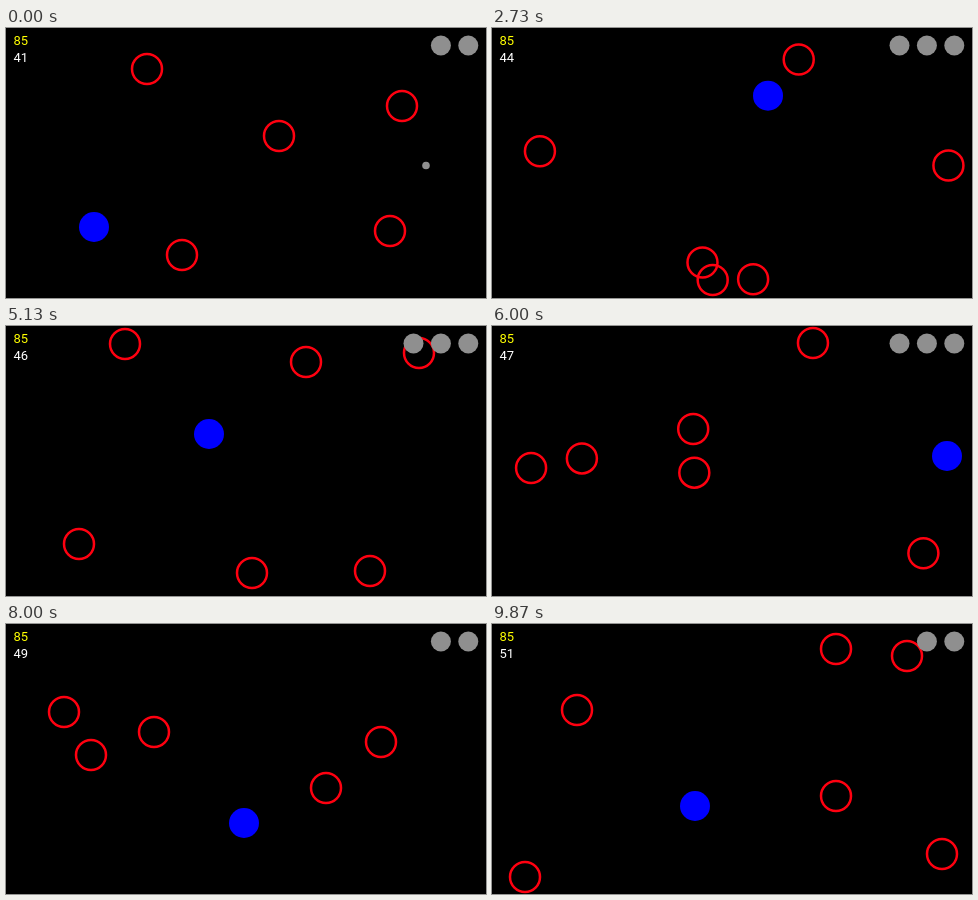
Animation, 480 px wide and 270 px high, one loop 9940 ms. Source, as an HTML page with a canvas:

```html
<!DOCTYPE html>
<html>
<head>
<meta charset="utf-8">
<style>
html, body { margin: 0; width: 100%; height: 100%; overflow: hidden; background: #000; }
canvas { display: block; }
</style>
</head>
<body>
<canvas id="stage" width="480" height="270"></canvas>
<script>
const ctx = document.getElementById('stage').getContext('2d');
const LOOP = 9940, LAST = 148, FPS = 15;

// Ticks at which the rings change course.
const TURNS = [0, 24, 57, 77, 102, 120, 148];
const always = () => true;

// Ring courses in unfolded space; the walls mirror them back onto the stage.
const RINGS = [
  { path: [[141, 41], [41, 181], [370, 285], [246, 247], [162, 54], [320, 164], [415, 476]], alive: always },
  { path: [[176, 227], [-72, 264], [-377, 250], [-532, 245], [-277, 211], [-116, 108], [-1, 253]], alive: always },
  { path: [[273, 108], [442, 251], [470, 483], [628, 472], [818, 343], [955, 250], [981, 422]], alive: n => n < 107 || n > 135 },
  { path: [[396, 78], [561, 205], [845, 304], [809, 490], [865, 270], [981, 131], [1240, 25]], alive: always },
  { path: [[384, 203], [231, 136], [378, -127], [515, 5], [692, 28], [553, -86], [478, -198]], alive: always },
  { path: [[200, 110], [84, 27], [-110, 214], [73, 290], [-81, 436], [58, 564], [344, 648]], alive: n => n > 19 }
];

const PLAYER_TURNS = [0, 20, 24, 57, 77, 90, 102, 120, 148];
const PLAYER = [[88, 199], [405, 132], [344, 80], [212, 56], [203, 108], [455, 130], [360, 186], [238, 199], [203, 182]];

function along(times, points, n) {
  let i = 0;
  while (i < times.length - 2 && n >= times[i + 1]) i++;
  const k = (n - times[i]) / (times[i + 1] - times[i]);
  return points[i].map((v, axis) => v + (points[i + 1][axis] - v) * k);
}

function bounce(v, min, max) {
  const span = max - min, period = 2 * span;
  const m = ((v - min) % period + period) % period;
  return min + (m > span ? period - m : m);
}

function circle(x, y, r) {
  ctx.beginPath();
  ctx.arc(x, y, r, 0, 2 * Math.PI);
}

function disc(x, y, r, color) {
  circle(x, y, r);
  ctx.fillStyle = color;
  ctx.fill();
}

function label(text, y, color) {
  ctx.fillStyle = color;
  ctx.fillText(text, 7.5, y);
}

function draw(n) {
  ctx.fillStyle = '#000';
  ctx.fillRect(0, 0, 480, 270);

  if (n < 20) disc(420, 137.5, 3.8, '#8f8f8f');
  if (n >= 100 && n < 107) disc(219 - 28 * (n - 102), 185, 3.8, '#fff');

  disc(...along(PLAYER_TURNS, PLAYER, n), 15, '#00f');

  ctx.strokeStyle = '#ff0010';
  ctx.lineWidth = 2.5;
  for (const ring of RINGS) {
    if (!ring.alive(n)) continue;
    const [x, y] = along(TURNS, ring.path, n);
    circle(bounce(x, 16, 464), bounce(y, 16, 254), 15);
    ctx.stroke();
  }

  const shots = n >= 20 && n <= 102 ? 3 : 2;
  for (let i = 0; i < shots; i++) disc(462.3 - 27.4 * i, 17.5, 10, '#8f8f8f');

  ctx.font = '13px Roboto, sans-serif';
  label('85', 17, '#ff0');
  label(41 + Math.floor(n / FPS + 0.3), 33.5, '#fff');
}

function loop() {
  const t = performance.now() % LOOP;
  draw(Math.min(LAST, Math.floor(t * FPS / 1000 + 0.1)));
  requestAnimationFrame(loop);
}
loop();
</script>
</body>
</html>
```
